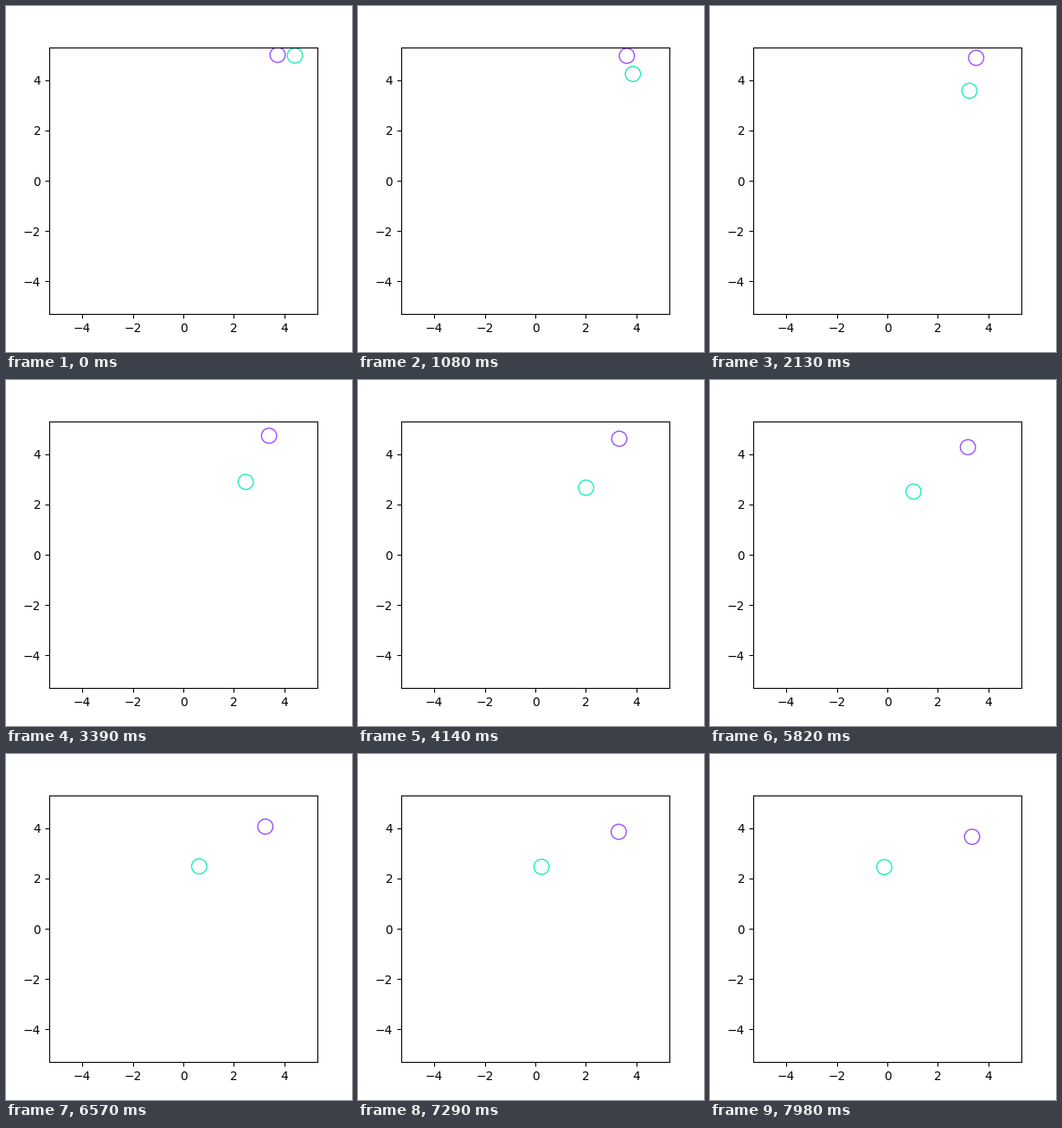
A matplotlib script that plays this animation: 400x400 px, repeating every 8 s.

```python
import numpy as np
import matplotlib.pyplot as plt
from matplotlib.animation import FuncAnimation
from matplotlib.patches import Circle

LOOP = 8000
FRAMES = 267
STEP = 0.03  # seconds per frame
RADIUS = 0.3
LIMIT = 5 + RADIUS

# Key points as (time, position, velocity), with x + yj for vectors.
# A repeated time marks a sudden change of velocity.
PURPLE = [
    (0.00, 3.727 + 5.007j, -0.100 - 0.010j),
    (5.75, 3.180 + 4.300j, -0.080 - 0.220j),
    (5.75, 3.180 + 4.300j, 0.077 - 0.288j),
    (7.98, 3.351 + 3.658j, 0.077 - 0.288j),
]
TEAL = [
    (0.00, 4.410 + 4.980j, -0.460 - 0.690j),
    (2.83, 2.815 + 3.170j, -0.620 - 0.557j),
    (4.45, 1.820 + 2.620j, -0.600 - 0.110j),
    (7.98, -0.120 + 2.454j, -0.530 - 0.015j),
]


def glide(keys, t):
    """Cubic Hermite position at time t."""
    times = [key[0] for key in keys]
    k = np.clip(np.searchsorted(times, t, side="right"), 1, len(keys) - 1)
    (t0, p0, v0), (t1, p1, v1) = keys[k - 1], keys[k]
    h = t1 - t0
    u = (t - t0) / h
    ease = u * u * (3 - 2 * u)
    bend = u * (1 - u) * (v0 * (1 - u) - v1 * u)
    return p0 + (p1 - p0) * ease + h * bend


fig, ax = plt.subplots(figsize=(4, 4), dpi=100)
ax.set(xlim=(-LIMIT, LIMIT), ylim=(-LIMIT, LIMIT))


def add_ring(color):
    return ax.add_patch(Circle((0, 0), RADIUS, fill=False, edgecolor=color))


rings = [(add_ring("#9b4dff"), PURPLE), (add_ring("#1aefb9"), TEAL)]


def update(i):
    for ring, keys in rings:
        pos = glide(keys, i * STEP)
        ring.center = pos.real, pos.imag
    return [ring for ring, _ in rings]


anim = FuncAnimation(fig, update, frames=FRAMES, interval=LOOP / FRAMES,
                     repeat=True, repeat_delay=0)
plt.show()
```
